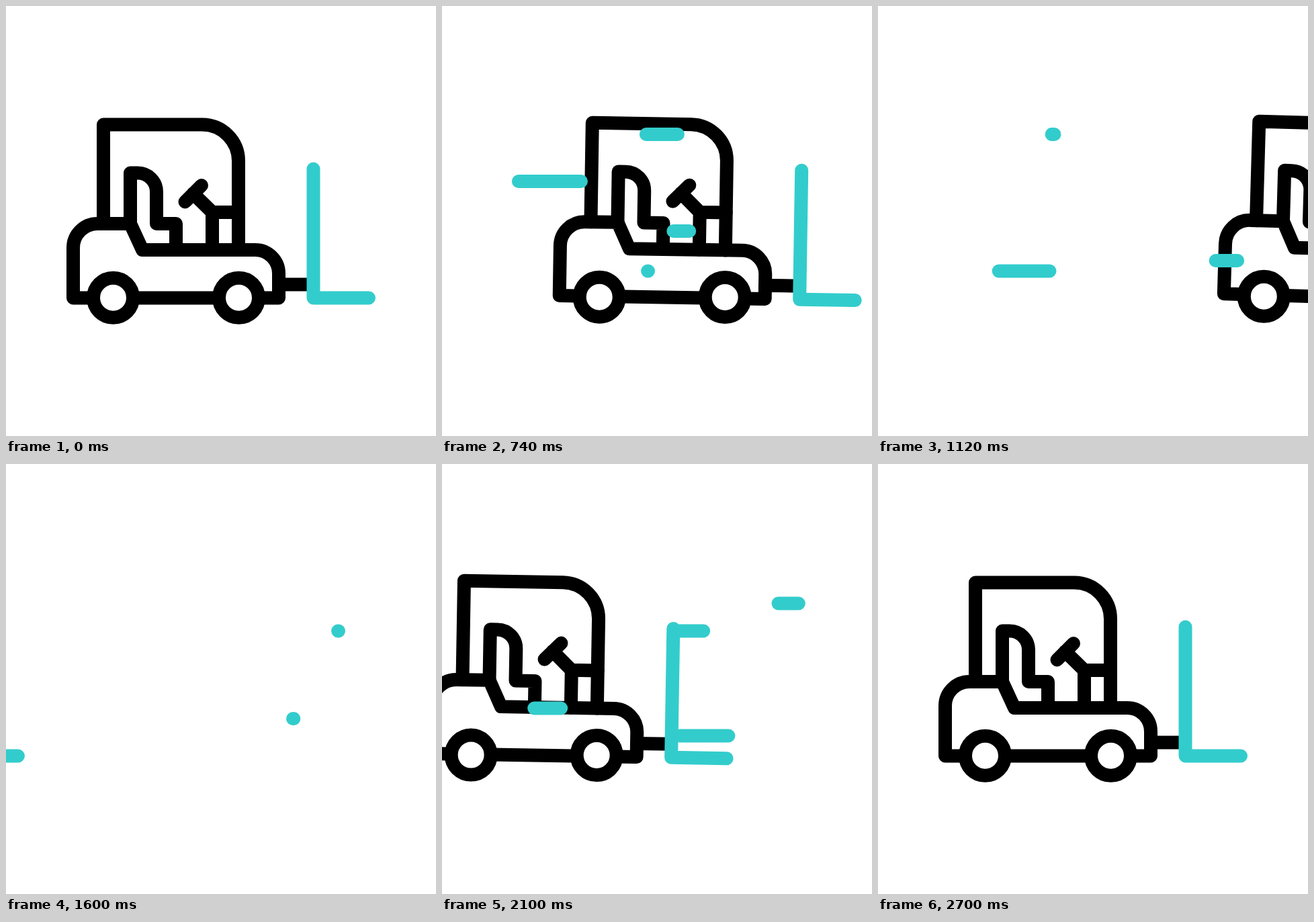
Animation of 640x640 px, one loop 2.8 s. Source, as an HTML page:

```html
<!DOCTYPE html>
<html lang="en">
<head>
<meta charset="utf-8">
<title>Forklift</title>
<style>
  html, body { margin: 0; width: 100%; height: 100%; overflow: hidden; background: #fff; }
  svg { display: block; width: 100vw; height: 100vh; }
  g { fill: none; stroke: #000; stroke-width: 20; stroke-linecap: round; stroke-linejoin: round; }
  .teal { stroke: #3cc; }
  circle { fill: #fff; }
</style>
</head>
<body>
<svg viewBox="0 0 640 640">
  <g id="truck">
    <g id="body">
      <path d="M145 324V176.500H292A54 54 0 0 1 346 230.500V363"/>
      <path d="M100 434.500V360A36 36 0 0 1 136 324H185L203 363H371A35 35 0 0 1 406 398V434.500Z"/>
      <path d="M185 324V248.500H196A28 28 0 0 1 224 276.500V324H253V363"/>
      <path d="M307 363V307H346M307 307L278.500 279M266.500 291.500L291 267"/>
      <path d="M406 414.500H457"/>
      <path class="teal" d="M457.500 242.500V434.500H540"/>
    </g>
    <circle class="wheel" cx="159.500" cy="434.300" r="29.500"/>
    <circle class="wheel" cx="346.500" cy="434.300" r="29.500"/>
  </g>
  <g id="wind" class="teal"></g>
</svg>
<script>
const LOOP = 2800, GUST = 650, EXIT = 1340;

// each key: [time, value]
const driveOut = [[60, 0], [500, -19.2], [1494, 616]];
const driveIn = [[1264, -657], [2440, 20], [2690, 0]];
const tilt = [[60, 0], [515, -3], [900, 3.2], [1350, 0], [1600, 0],
              [1890, -1], [2240, 2], [2480, -1], [2690, 0]];

// each gust: [y, start time, right end, length]
const gusts = [
  [335, 212, 448, 105], [261, 404, 246, 170], [191, 493, 358.6, 100],
  [394.500, 737, 307, 147], [379, 958, 537, 110], [248.500, 1597, 495, 152],
  [404.500, 1840, 440, 147], [363.500, 1899, 181, 105], [207.500, 1941, 532.5, 105]
];

const smooth = u => u * u * (3 - 2 * u);

function track(keys, t) {
  if (t <= keys[0][0]) return keys[0][1];
  for (let i = 1; i < keys.length; i++) {
    const [t0, a] = keys[i - 1], [t1, b] = keys[i];
    if (t < t1) return a + (b - a) * smooth((t - t0) / (t1 - t0));
  }
  return keys[keys.length - 1][1];
}

const truck = document.getElementById("truck");
const body = document.getElementById("body");
const wheels = document.querySelectorAll(".wheel");
const wind = document.getElementById("wind");
const lines = gusts.map(() =>
  wind.appendChild(document.createElementNS("http://www.w3.org/2000/svg", "path")));

function drawGust(line, [y, start, x, len], t) {
  const u = (t - start) / GUST;
  const on = u >= 0 && u <= 1;
  line.style.display = on ? "" : "none";
  if (!on) return;
  const p = u - 0.08 * Math.sin(2 * Math.PI * u);
  const head = x - len * (1 - (1 - p) ** 2);
  const tail = x - len * p ** 2.3;
  line.setAttribute("d", `M${tail} ${y}L${Math.min(head, tail - 0.01)} ${y}`);
}

function draw(t) {
  const x = track(t < EXIT ? driveOut : driveIn, t);
  const a = track(tilt, t);
  truck.setAttribute("transform", `translate(${x} 0)`);
  body.setAttribute("transform", `rotate(${a} 316 434)`);
  wheels[0].setAttribute("cy", 434.3 - 1.25 * a);
  wheels[1].setAttribute("cy", 434.3 - 0.85 * a);
  lines.forEach((line, i) => drawGust(line, gusts[i], t));
}

const begin = performance.now();
function tick() {
  draw((performance.now() - begin) % LOOP);
  requestAnimationFrame(tick);
}
draw(0);
requestAnimationFrame(tick);
</script>
</body>
</html>
```
